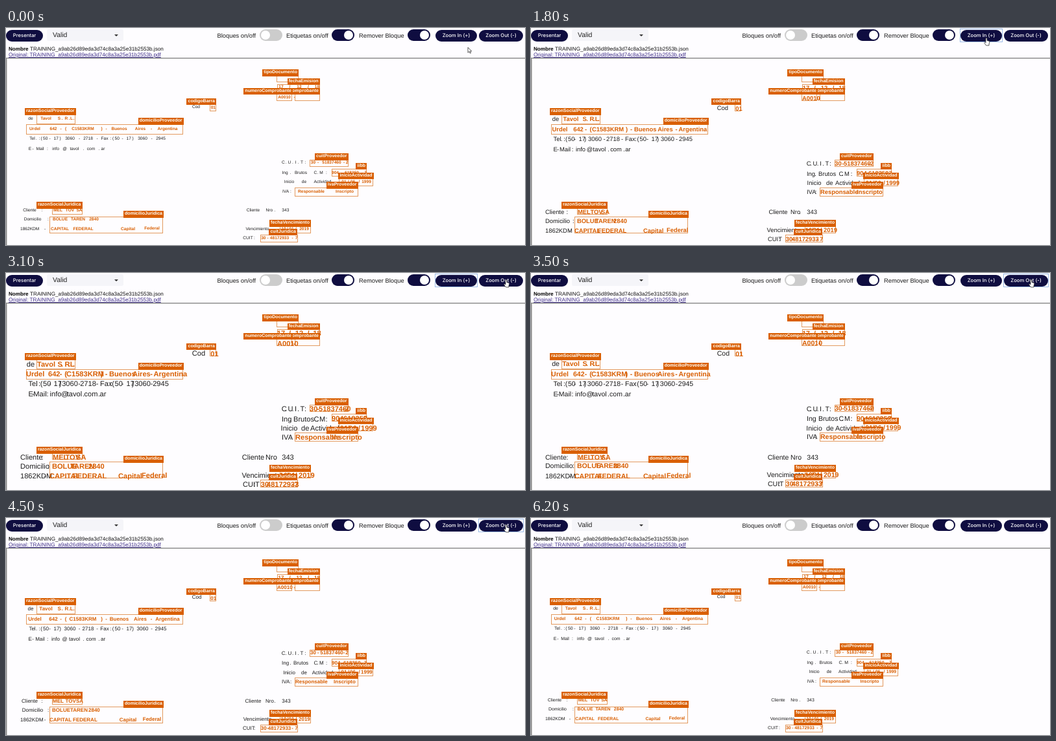
Recreate the animation shown at these times as an HTML page. Size 800 by 336 pixels, loop 6.3 s.

```html
<!DOCTYPE html>
<html lang="es">
<head>
<meta charset="utf-8">
<title>Etiquetado de documentos</title>
<style>
  html, body { margin: 0; width: 100%; height: 100%; overflow: hidden; background: #fff; }
  #stage {
    position: relative; width: 800px; height: 336px; overflow: hidden; background: #fefdff;
    font-family: "Liberation Sans", Arial, sans-serif; color: #1c1c1c;
    text-rendering: geometricPrecision;
  }
  #stage div, #stage svg { position: absolute; box-sizing: border-box; white-space: pre; }
  .text { height: 0; line-height: 0; }
  #doc { left: 0; top: 46px; width: 800px; height: 300px; border: solid #858585; border-width: 1px 0 0 1px; box-shadow: inset 1px 1px 0 #d0d0d0; }
  #boxes, #words { left: 0; top: 0; }
  #words { font-size: 6.6px; --k: 0; }
  .word { height: 0; line-height: 0; text-align: center; }
  .hot { color: #d95f02; font-weight: bold; }
  .box { border: 1px solid #e39a5f; }
  .tag { height: 10.5px; padding: 0 2px; line-height: 10.5px; background: #d95f02; color: #fff; font-weight: bold; font-size: 7.05px; }
  .button { height: 18px; top: 2.5px; border-radius: 9px; background: #0f0d40; color: #fff; font: 500 7.7px/18px Inter, sans-serif; text-align: center; }
  .focus { top: 1px; height: 21px; border: 1px solid #9dbce8; visibility: hidden; }
  .switch { top: 2px; width: 35px; height: 18px; border-radius: 9px; background: #ccc; }
  .switch::after { content: ""; position: absolute; left: 2px; top: 2px; width: 14px; height: 14px; border-radius: 50%; background: #fff; }
  .switch.on { background: #0f0d40; }
  .switch.on::after { left: 19px; }
  #cursor { left: 0; top: 0; overflow: visible; }
  #cursor path { fill: #fff; stroke: #333; stroke-width: .8; }
</style>
</head>
<body>
<div id="stage">
  <div id="doc"></div>
  <div id="boxes"></div>
  <div id="words"></div>
</div>
<script>
const stage = document.getElementById('stage');
const boxes = document.getElementById('boxes');
const words = document.getElementById('words');

function add(parent, cls, style, text = '') {
  const el = document.createElement('div');
  el.className = cls;
  for (const key in style) {
    const v = style[key];
    el.style[key] = typeof v === 'number' ? v + 'px' : v;
  }
  el.textContent = text;
  parent.append(el);
  return el;
}

// Each word is centred in its own cell and runs over the right edge when too wide.
function line(y, drop, cls, list) {
  for (const [text, centre, width = 120] of list) {
    add(words, 'word ' + cls, {
      left: centre - width / 2, width, top: `calc(${y}px + var(--k) * ${drop}px)`
    }, text);
  }
}
const box = (left, top, right, bottom) =>
  add(boxes, 'box', { left, top, width: right - left, height: bottom - top });
const tag = (text, right, top) => add(stage, 'tag', { right: 800 - right, top }, text);
const label = (text, left, y, size, extra = {}) =>
  add(stage, 'text', { left, top: y, fontSize: size + 'px', ...extra }, text);

// Toolbar
const button = (text, left, width) => add(stage, 'button', { left, width }, text);
button('Presentar', 0, 57);
button('Zoom In (+)', 662, 64);
button('Zoom Out (-)', 729, 68);
const focusIn = add(stage, 'focus', { left: 661, width: 66 });
const focusOut = add(stage, 'focus', { left: 728, width: 70 });

add(stage, '', { left: 63, top: 2, width: 118, height: 18, borderRadius: '3px', background: '#f5f5f9' });
label('Valid', 72, 11.5, 10.4, { color: '#222' });
add(stage, '', { left: 167, top: 10, border: '3px solid transparent', borderTopColor: '#333', borderBottom: '0' });
[['Bloques on/off', 325.5, 391, ''], ['Etiquetas on/off', 432, 502, ' on'], ['Remover Bloque', 544, 618.5, ' on']]
  .forEach(([text, x, left, on]) => {
    label(text, x, 11.5, 9.35);
    add(stage, 'switch' + on, { left });
  });

const file = 'TRAINING_a9ab26d89eda3d74c8a3a25e31b2553b';
label('Nombre', 4, 32.5, 8.1, { fontWeight: 'bold', color: '#000' });
label(file + '.json', 37, 32.5, 8.18, { color: '#111' });
label(`Original: ${file}.pdf`, 4, 42, 8.18, { color: '#40308a', textDecoration: 'underline' });

// Supplier
line(141, 0.5, '', [['de', 38]]);
line(141, 0.5, 'hot', [
  ['Tavol', 61.5, 27], ['S', 82, 5], ['.', 86.5], ['R', 93, 5], ['.', 97.5], ['L', 101, 4.5], ['.', 104.5]
]);
line(156.5, 0.5, 'hot', [
  ['Urdel', 44.5, 27], ['642', 73, 16], ['-', 84.5], ['(', 92], ['C1583KRM', 118.5, 51], [')', 147.5], ['-', 154.5],
  ['Buenos', 174.5, 31], ['Aires', 207, 24], ['-', 224], ['Argentina', 249, 43]
]);
line(171.5, 0.5, '', [
  ['Tel', 40.5, 12], ['.', 47], [':', 51.5], ['(', 54.5], ['50', 60.5, 7], ['-', 67.5], ['17', 77, 7], [')', 83.5],
  ['3060', 98.5], ['-', 113], ['2718', 126.5], ['-', 140.5], ['Fax', 152, 14], [':', 161.5], ['(', 165],
  ['50', 171, 7], ['-', 179.5], ['17', 189, 7], [')', 195.5], ['3060', 210.5], ['-', 224.5], ['2945', 238.5]
]);
line(187.5, 0, '', [
  ['E', 37, 5], ['-', 41.5], ['Mail', 52.5], [':', 64], ['info', 76.5], ['@', 90.5], ['tavol', 105.5],
  ['.', 119.5], ['com', 131], ['.', 143.5], ['ar', 149.5]
]);

// Voucher
line(122.5, 2.5, '', [['Cod', 293, 12.5]]);
line(124, 2, 'hot', [['01', 319.3, 8]]);
line(92, 2, 'hot', [['17', 424], ['/', 437.5], ['12', 452], ['/', 466], ['18', 479.5]]);
line(108, 1.5, 'hot', [['A0010', 429, 22], ['-', 444.5]]);

// Tax data
line(209, 2, '', [
  ['C', 427.3, 5], ['.', 431.5], ['U', 437, 5], ['.', 442], ['I', 446.5], ['.', 450.5], ['T', 456, 5], [':', 461.5]
]);
line(209, 1.5, 'hot', [['30', 473.5, 11], ['-', 481], ['51837460', 502, 40], ['-', 521], ['2', 525.5]]);
line(224.5, 2, '', [['Ing', 430, 10], ['.', 438.5], ['Brutos', 454.5, 23], ['C', 477, 5], ['.', 480.5], ['M', 486, 6], [':', 494]]);
line(224.5, 1.5, 'hot', [['904', 507.5, 11], ['-', 517], ['618350', 533, 26], ['-', 549], ['7', 554]]);
line(239, 2, '', [['Inicio', 436.5], ['de', 459.5, 9], ['Actividad', 488, 38]]);
line(239, 1.5, 'hot', [['01', 521], ['/', 528], ['06', 534.5], ['/', 544.5], ['1999', 555.5, 17]]);
line(253.5, 1, '', [['IVA', 431, 12], [':', 439]]);
line(253.5, 1, 'hot', [['Responsable', 470.5, 49], ['Inscripto', 522, 40]]);

// Customer
line(283, 3, '', [
  ['Cliente', 36.5, 29], [':', 55.5, 2], ['Cliente', 381], ['Nro', 405.8, 11.5], ['.', 414.5], ['343', 430.8, 11]
]);
line(283, 3, 'hot', [['MEL', 80, 16], ['TOV', 98.5, 14], ['SA', 113, 10]]);
line(297, 2.5, '', [['Domicilio', 41, 38], [':', 65, 2]]);
line(297, 2.5, 'hot', [['BOLUE', 83.5, 25], ['TAREN', 111, 24], ['2840', 135.5, 17]]);
line(312, 3, '', [['1862KDM', 36.5, 29], ['-', 60]]);
line(312, 3, 'hot', [['CAPITAL', 83, 32], ['FEDERAL', 119, 32], ['Capital', 188, 30]]);
line(311, 3, 'hot', [['Federal', 225, 32]]);
line(312, 1.5, '', [['Vencimiento', 387.5, 48]]);
line(312, 1.5, 'hot', [['10', 428], ['/', 434], ['01', 440], ['/', 447], ['2019', 459.5, 17]]);
line(326, 1.5, '', [['CUIT', 373, 16], [':', 383]]);
line(326, 1.5, 'hot', [['30', 396.8, 8], ['-', 403.5], ['48172933', 421.5, 39], ['-', 441.5], ['7', 447.5]]);

[
  [417, 74, 451, 84], [418, 87, 484, 97], [417, 102, 441, 113], [445, 102, 484, 113], [314, 118, 324, 129],
  [47, 134, 107, 149], [31, 149, 273, 165], [468, 204, 528, 215], [502, 218, 556, 230], [513, 233, 566, 245]
].forEach(b => box(...b));
[
  [445, 247, 543, 261], [71, 279, 118, 289], [67, 292, 242, 318], [422, 307, 470, 318], [392, 320, 450, 332]
].forEach(b => box(...b));

[
  ['tipoDocumento', 451, 64], ['fechaEmision', 483.5, 77.5], ['numeroComprobante', 484, 92.5],
  ['numeroComprobante', 442, 92.5], ['codigoBarra', 324, 108.5], ['razonSocialProveedor', 107.5, 124],
  ['domicilioProveedor', 273.5, 139], ['cuitProveedor', 527.5, 194], ['iibb', 556, 208.5],
  ['inicioActividad', 566.5, 223.5], ['ivaProveedor', 542.5, 238], ['razonSocialJuridica', 117.5, 269],
  ['domicilioJuridica', 243, 283], ['fechaVencimiento', 470, 297], ['cuitJuridica', 449, 310.5]
].forEach(t => tag(...t));

stage.insertAdjacentHTML('beforeend', `
  <svg id="cursor" width="9" height="13">
    <path id="arrow" d="M0 0v8.2l2-1.8 1.3 2.8 1.3-.6L3.3 6H5.8z"/>
    <path id="hand" d="M-1 5.5V1Q-1 0 0 0T1 1V4L4 4.7Q5 5 4.8 6.2L4 9.5V11.5H-.5L-3 8Q-3.6 6.6-2.5 6.3L-1 7.5z"/>
  </svg>`);
const cursor = document.getElementById('cursor');
const arrow = document.getElementById('arrow');
const hand = document.getElementById('hand');

// Motion
const LOOP = 6300, TICK = 100, MAX = 16;
const every = (from, to) => Array.from({ length: (to - from) / TICK + 1 }, (_, i) => from + i * TICK);
const zoomIn = [800, ...every(1000, 2400)];
const zoomOut = [3300, 3500, ...every(3700, 4800), 5100];
const path = [
  [0, 712, 30], [100, 712, 30], [400, 707, 24], [600, 706, 23], [800, 702, 15.5], [2700, 702, 15.5],
  [3000, 771, 10.5], [5200, 771, 10.5], [5600, 770, -16], [LOOP, 770, -16]
];
const count = (times, t) => times.filter(s => s <= t).length;
const show = (el, on) => { el.style.visibility = on ? 'visible' : 'hidden'; };

function place(t) {
  const i = path.findIndex(p => p[0] > t);
  const [t0, x0, y0] = path[i - 1], [t1, x1, y1] = path[i];
  const f = (t - t0) / (t1 - t0);
  return [x0 + (x1 - x0) * f, y0 + (y1 - y0) * f];
}

let last = -1;
function draw(now) {
  const t = Math.floor((now % LOOP) / TICK) * TICK;
  if (t !== last) {
    last = t;
    const level = count(zoomIn, t) - count(zoomOut, t);
    words.style.fontSize = 6.6 + level * 0.28 + 'px';
    words.style.setProperty('--k', level / MAX);
    const [x, y] = place(t);
    cursor.style.transform = `translate(${x}px, ${y}px)`;
    show(hand, y < 21);
    show(arrow, y >= 21);
    show(focusIn, t >= 800 && t < 3200);
    show(focusOut, t >= 3200 && t < 6200);
  }
  requestAnimationFrame(draw);
}
draw(performance.now());
</script>
</body>
</html>
```
